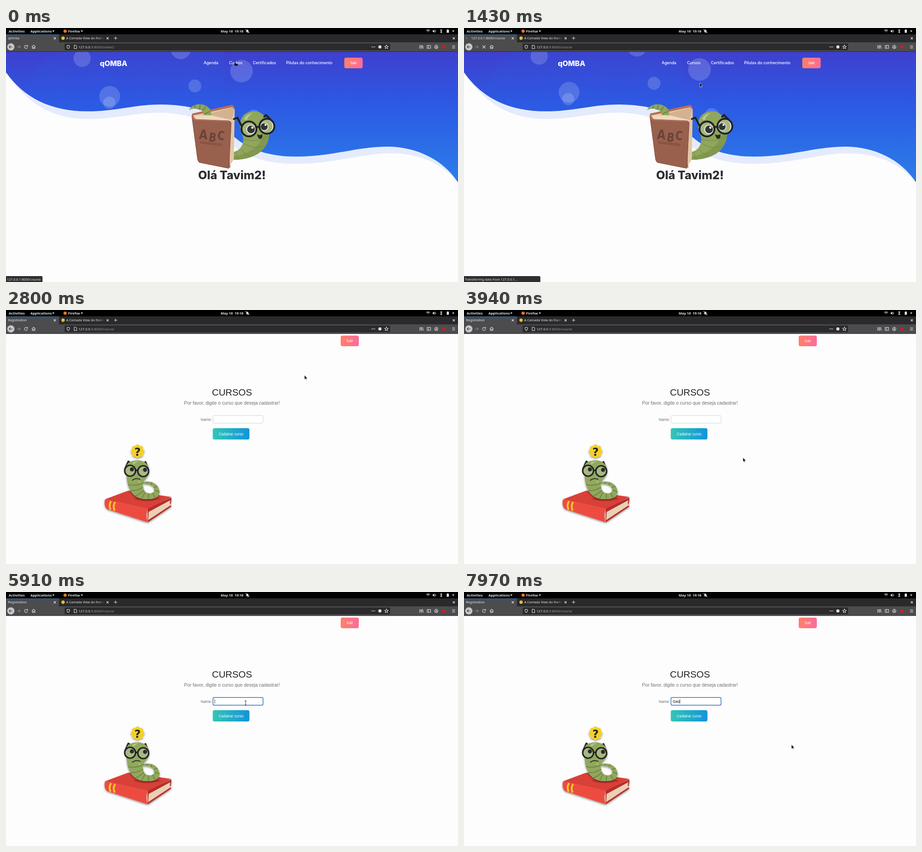
Animation, 998 px wide and 561 px high, one loop 8 s. Source, as an HTML page:

```html
<!DOCTYPE html>
<html lang="pt">
<head>
<meta charset="utf-8">
<style>
html, body { margin: 0; width: 100%; height: 100%; overflow: hidden; background: #fdfdfd; }
svg { display: block; width: 100vw; height: 100vh; }
text { white-space: pre; }
.ui { font: 7.25px "Noto Sans", sans-serif; fill: #e6e6e6; }
.menu { font: 600 7.6px "Noto Sans", sans-serif; fill: #e6e6e6; }
.url { font-size: 7.65px; }
.nav { font: 500 8.75px Inter, sans-serif; fill: #fff; }
.form { font: 8.3px "Liberation Sans", sans-serif; fill: #6c6f73; }
.line { fill: none; stroke: #ddd; stroke-width: 1.1; }
.mid { text-anchor: middle; }
.ink { fill: none; stroke: #202322; stroke-linecap: round; stroke-linejoin: round; }
</style>
</head>
<body>
<svg viewBox="0 0 998 561" preserveAspectRatio="none">
<defs>
  <linearGradient id="sky" x2="0" y2="1">
    <stop stop-color="#3e40cd"/><stop offset=".4" stop-color="#2c59e4"/><stop offset="1" stop-color="#2b7ee9"/>
  </linearGradient>
  <linearGradient id="coral"><stop stop-color="#ff8068"/><stop offset="1" stop-color="#fc6c9c"/></linearGradient>
  <linearGradient id="teal"><stop stop-color="#33c6b6"/><stop offset="1" stop-color="#1294db"/></linearGradient>
  <linearGradient id="tabFade"><stop stop-color="#2a2a2c" stop-opacity="0"/><stop offset="1" stop-color="#2a2a2c"/></linearGradient>
  <linearGradient id="burstFill"><stop stop-color="#2878b8" stop-opacity=".65"/><stop offset="1" stop-color="#2878b8" stop-opacity="0"/></linearGradient>
  <filter id="shadow" x="-20%" y="-20%" width="140%" height="140%">
    <feDropShadow dx="0" dy="2" stdDeviation="2" flood-opacity=".45"/>
  </filter>
  <clipPath id="page"><path d="M0 52H998V561H0Z"/></clipPath>
  <clipPath id="heroBody"><path d="M496 275C517 273 527 257 523 239Q515 221 517 211C519 193 531 184 548 184C569 184 580 203 581 228C583 263 557 293 495 291Z"/></clipPath>
  <clipPath id="thinkerBody"><path id="thinkerShape" d="M265 355C263 338 276 332 290 332C307 332 316 342 316 357C316 369 303 374 302 386C302 401 312 408 323 404C333 399 327 383 305 384L301 381C322 374 338 386 339 401C339 413 329 418 312 418C285 419 270 401 267 374Z"/></clipPath>
</defs>

<rect width="998" height="561" fill="#fdfdfd"/>

<g id="home" clip-path="url(#page)">
  <path fill="#e4ebfc" d="M0 52H998V341C950 285 890 275 835 277C775 280 720 300 640 300C540 300 500 262 480 240C455 205 400 189 345 187C285 186 245 201 180 201C100 201 45 165 0 98Z"/>
  <path fill="url(#sky)" d="M0 52H998V341C965 290 905 262 842 262C775 262 720 284 640 284C540 284 500 240 480 215C455 180 400 170 345 169C285 168 245 184 180 184C100 184 40 155 0 98Z"/>
  <path fill="#2b5de0" opacity=".16" d="M128 52C85 65 55 92 50 145Q100 184 180 184C245 184 285 168 345 169C400 170 455 180 480 215V52Z"/>
  <g id="bubbles" fill="#fff" fill-opacity=".17"></g>
  <text x="237.500" y="84" class="mid" style="font:800 16px Inter,sans-serif" fill="#fff">qOMBA</text>
  <g class="nav">
    <text x="436.500" y="80">Agenda</text><text x="492.500" y="80">Cursos</text>
    <text x="545" y="80">Certificados</text><text x="618.500" y="80">Pilulas do conhecimento</text>
    <rect x="747" y="65.500" width="40.500" height="23.500" rx="4" fill="url(#coral)"/>
    <text x="767.300" y="80" class="mid" style="font-size:8px">Sair</text>
  </g>

  <!-- worm and alphabet book -->
  <g clip-path="url(#heroBody)">
    <path fill="#8fa65b" d="M490 180H590V300H490Z"/>
    <path d="M573 190Q583 270 500 285V300H590V190Z" fill="#819850"/>
    <path class="line" style="stroke:#768b49" d="M522 244Q550 256 582 238M526 255Q548 271 578 258M520 268Q532 288 560 282M508 273Q508 286 516 293"/>
    <path d="M525 202Q531 189 545 188Q535 193 532 203Z" fill="#b8c98a"/>
  </g>
  <path fill="#b96c53" d="M410 195L411 189L500 169.500L505 176L504 178L495 310Z"/>
  <path fill="#e5c6a5" d="M413 193L499 175L505 180L503 290L494 304L491 208L418 201Z"/>
  <path fill="#d5b191" d="M418 197L499 176L504 180L497 207Z"/>
  <path fill="#efd9bd" d="M414 194L450 192L497 203V207L420 202Z"/>
  <path fill="#8fa65b" d="M404 182C410 167 432 165 445 174C454 181 453 188 453 193L436 192C437 184 430 178 419 178Q409 178 404 182Z"/>
  <path class="line" style="stroke:#748a46;stroke-width:3" d="M417 170L418 178M429 170L427 179M441 174L434 183M451 184L438 190"/>
  <path fill="#99604e" stroke="#7d493b" d="M410.500 196Q412 202 420 202L492 205Q498 206 497 213L492 310L427 297Q424 295 423 290Z"/>
  <path class="line" style="stroke:#c28670" d="M412 198Q414 203 421 203L493 206"/>
  <g fill="#6b4338" style="font:800 30px 'DejaVu Sans',sans-serif" class="mid">
    <text transform="translate(435 246) rotate(4) scale(.82 1)">A</text>
    <text transform="translate(455 251) rotate(8) scale(.72 .9)">B</text>
    <text transform="translate(474 247) rotate(6) scale(.72 .9)">C</text>
  </g>
  <path class="line" style="stroke:#6b4338" d="M428 251L478 257M429 254L477 260"/>
  <circle cx="536" cy="223" r="16" fill="#a6b580"/><circle cx="576" cy="217" r="16" fill="#dcdfda"/>
  <path d="M576 202A16 16 0 0 1 579 232Q561 235 560 217Q562 203 576 202Z" fill="#a6b580"/>
  <g fill="#e8e9e2"><circle cx="541" cy="224" r="10.500"/><circle cx="570" cy="218" r="9.500"/></g>
  <g fill="#303631"><circle cx="541" cy="224" r="8.500"/><circle cx="570" cy="218" r="7.700"/></g>
  <g fill="#fff"><circle cx="544" cy="220" r="2.500"/><circle cx="573" cy="214" r="2.300"/></g>
  <path class="ink" stroke-width="4" d="M520 223a16.500 16.500 0 1 0 33 0a16.500 16.500 0 1 0-33 0M559.500 217a16.500 16.500 0 1 0 33 0a16.500 16.500 0 1 0-33 0M552 220Q556 217 560 219M520 216L511 198L503 201M589 207L574 192L570 196"/>
  <path fill="#2b2c22" d="M554 234Q560 239 566 234Q568 245 560 245Q556 243 554 234Z"/>
  <text x="499" y="334" class="mid" style="font:800 25.500px Inter,sans-serif" fill="#2d2d31">Olá Tavim2!</text>
</g>

<g id="course">
  <rect x="739" y="56.500" width="40" height="23.500" rx="4" fill="url(#coral)"/>
  <text x="759" y="71" class="form mid" style="fill:#fff">Sair</text>
  <text x="499" y="189" class="form mid" style="font-size:20.700px;fill:#202327">CURSOS</text>
  <text x="499" y="209" class="form mid" style="font-size:10.370px">Por favor, digite o curso que deseja cadastrar!</text>
  <text x="430" y="244.500" class="form">Name:</text>
  <rect id="field" x="457" y="233" width="110.500" height="17" rx="2.500" fill="#fff"/>
  <text id="typed" x="461" y="244.500" class="form" style="fill:#111"></text>
  <path id="caret" d="M.5 237V246.500" stroke="#111" stroke-width=".8"/>
  <rect x="456.500" y="261" width="81" height="25" rx="4" fill="url(#teal)"/>
  <text x="497" y="276.500" class="form mid" style="fill:#fff">Cadatrar curso</text>

  <!-- thinking worm on a red book -->
  <g filter="url(#shadow)">
    <path fill="#b52e2b" d="M313 438L365 414V420L363 431L365 434L313 469Z"/>
    <path fill="#ead0b5" d="M315 446L363 420Q360 427 364 431L314 464Z"/>
    <path fill="#d94038" d="M219 418L270 399L365 413L313 439Z"/>
    <path fill="#ee4b41" d="M219 418Q217 423 218 430Q219 437 224 440L313 469Q307 453 313 439Z"/>
    <path class="line" style="stroke:#f6c928;stroke-width:4" d="M232 422Q226 431 231 441M241 424Q235 433 240 443"/>
  </g>
  <ellipse cx="312" cy="417" rx="30" ry="4" fill="#a92e29" opacity=".6"/>
  <g filter="url(#shadow)">
    <path class="ink" stroke-width="3" d="M263 350L270 334L280 342M301 342L308 335L314 350"/>
    <use href="#thinkerShape" fill="#91a85d"/>
  </g>
  <g clip-path="url(#thinkerBody)">
    <path class="line" style="stroke:#778c49;stroke-width:2.500" d="M264 383Q281 392 305 381M268 397Q286 403 303 391M279 413Q292 410 305 398M298 420L307 402M314 420L315 404M331 418L323 402M342 403L327 397M337 388L325 393M323 376L320 388M311 376V387"/>
    <path fill="#b5c487" d="M279 338Q285 333 293 334Q285 337 282 342Z"/>
  </g>
  <g fill="#a9b781"><circle cx="274" cy="355" r="11"/><circle cx="303" cy="356" r="11"/></g>
  <g fill="#282d29"><circle cx="278" cy="352" r="4.500"/><circle cx="307" cy="353" r="4.500"/></g>
  <path class="ink" stroke-width="3.200" d="M262 355a12 12 0 1 0 24 0a12 12 0 1 0-24 0M291 356a12 12 0 1 0 24 0a12 12 0 1 0-24 0M286 355Q289 353 291 355"/>
  <path class="ink" stroke-width="1.800" d="M279 376Q287 370 296 374"/>
  <path class="line" style="stroke:#c0cc98;stroke-width:2" d="M293 378L296 382"/>
  <path id="badge" fill="#f5d028" filter="url(#shadow)"/>
  <text x="290.500" y="321.500" class="mid" style="font:800 24px 'DejaVu Sans',sans-serif" fill="#242424">?</text>
</g>

<!-- desktop bar and browser -->
<rect width="998" height="52.500" fill="#4c4c4f"/>
<rect x="117" y="14" width="881" height="17" fill="#2a2a2c"/>
<rect width="998" height="14" fill="#000"/>
<rect y="14" width="117" height="1" fill="#2c608f"/>
<path d="M117 31H998" stroke="#252527"/>
<path d="M0 52H998" stroke="#29292b"/>
<rect id="burst" y="15" width="85" height="16" fill="url(#burstFill)"/>
<g class="menu">
  <text x="6" y="9.800">Activities</text><text x="54" y="9.800">Applications</text>
  <text x="137" y="9.800">Firefox</text><text x="474" y="9.800">May 16  19:16</text>
</g>
<path fill="#ddd" d="M102 5.500h5l-2.500 3.500zM165 5.500h5l-2.500 3.500zM985 5.500h5l-2.500 3.500z"/>
<circle cx="130.500" cy="7" r="3.600" fill="#e8752b"/>
<path fill="#ddd" d="M529 9Q531 8 531 5Q533 2 535 5Q535 8 537 9ZM532 10h2v1h-2zM942 5.500h2l2-2v7l-2-2h-2zM973 4h1.500V3h2v1H978v6.500h-5z"/>
<path class="line" d="M529 3L537 11M928 5.500Q932 2 936 5.500M929.500 7.300Q932 5 934.500 7.300M931.500 9.500h1M947.500 4.500Q950 7 947.500 9.500M959 7h4M961 3.500v7M959 5l2-1.500l2 1.500M959 9l2 1.500l2-1.500"/>
<g class="ui">
  <text id="tabTitle" y="25"></text>
  <text x="133" y="25">A Camada View do frame</text>
</g>
<circle id="spinner" cy="22.500" r="1" fill="#aaa"/>
<rect x="202" y="16" width="16" height="14" fill="url(#tabFade)"/>
<circle cx="126" cy="22.500" r="3.700" fill="#e4bd35"/>
<path class="line" d="M105.500 20.500l4.500 4.500m0-4.500l-4.500 4.500M222 20.500l4.500 4.500m0-4.500l-4.500 4.500M238.500 22.500h7m-3.500-3.500v7M986.500 20.500l4.500 4.500m0-4.500l-4.500 4.500"/>
<circle cx="10.700" cy="41.700" r="8" fill="#c9c9cb" stroke="#858588"/>
<path class="line" style="stroke:#39393c" d="M14.500 41.700H7M10 38.500l-3 3.200l3 3.200"/>
<path class="line" style="stroke:#8b8b8e" d="M24 41.700h7.500M28.500 38.500l3 3.200l-3 3.200"/>
<path id="reload" class="line" d="M47 39.500a3.500 3.500 0 1 0 .5 3.500M47.700 37.500v3h-3"/>
<path id="stop" class="line" d="M41 38.500l6.500 6.500m0-6.500l-6.500 6.500"/>
<path class="line" d="M57 41.500l4-3.500l4 3.500M58.300 41.500v3.700h1.700v-2.500h2v2.500h1.700v-3.700"/>
<rect x="130" y="35" width="717.500" height="13.500" rx="1.500" fill="#2b2b2d" stroke="#222224"/>
<path class="line" d="M134.500 39q2 0 3-1q1 1 3 1q0 5-3 6.500q-3-1.500-3-6.500zM150.500 38h3.500l2 2v5.500h-5.500zM840 37.500l1.200 2.700l2.800.3l-2.200 1.900l.7 2.900l-2.500-1.500l-2.500 1.500l.7-2.900l-2.200-1.900l2.800-.3z"/>
<text y="44.700" x="160" class="ui url">127.0.0.1<tspan id="path" fill="#98989b"></tspan></text>
<g fill="#ddd"><circle cx="808" cy="41.700" r="1"/><circle cx="811" cy="41.700" r="1"/><circle cx="814" cy="41.700" r="1"/><circle cx="825.500" cy="41.700" r="3.500"/></g>
<path class="line" d="M913.500 38v7.500M916 38v7.500M918 38v7.500M919.500 38l2 7.500M930 38.500h7.500v6.500H930zM933 38.500v6.500M985 39h6.500M985 41.700h6.500M985 44.500h6.500"/>
<circle cx="950" cy="41.700" r="3.700" class="line"/><circle cx="950" cy="40.700" r="1.300" fill="#ddd"/>
<path d="M947.500 44q2.500-2.500 5 0" class="line"/>
<circle cx="967" cy="41.700" r="3.700" fill="#d71920"/>

<g id="status">
  <rect id="statusBox" x="-1" y="548.500" height="14" rx="1.500" fill="#2d2f30" stroke="#202122"/>
  <text id="statusText" x="2" y="557.500" class="ui"></text>
</g>
<g id="pointer">
  <path id="arrow" d="M0 0V9.500L2.200 7.500L3.700 10.500L5 9.800L3.600 7H6.500Z" fill="#0b0b0b" stroke="#fff" stroke-width=".6"/>
  <path id="hand" d="M-2-4q1-1 1.500 0V0h4q1.500 0 1.300 2l-.8 2.500H-1L-4 0q1-1 2 0z" fill="#0b0b0b" stroke="#777" stroke-width=".3"/>
  <path id="beam" d="M-2-4.500h4M0-4.500v9M-2 4.500h4" fill="none" stroke="#222"/>
</g>
</svg>
<script>
const DURATION = 8000;
const COMMIT = 1250, PAGE_SHOWN = 1560, LOADED = 1840, IDLE = 2250, FOCUS = 5845;
const $ = id => document.getElementById(id);
const show = (id, on) => { $(id).style.display = on ? "" : "none"; };
const setText = (id, value) => { if ($(id).textContent !== value) $(id).textContent = value; };
const attr = (id, values) => Object.entries(values).forEach(([k, v]) => $(id).setAttribute(k, v));

// x, y, radius, then drift over 1430 ms
const bubbles = [
  [168, 67, 19, -2, -5], [386, 47, 22, -4, -6], [520, 95, 25, 0, -3.5],
  [417, 128, 14.300, 2.500, -6], [229, 151, 23, 3, -9], [228, 165, 13.500, 2, -8], [547, 196, 16, 0, -3]
].map(([x, y, r, dx, dy]) => {
  const circle = document.createElementNS("http://www.w3.org/2000/svg", "circle");
  circle.setAttribute("r", r);
  $("bubbles").append(circle);
  return { circle, x, y, dx, dy };
});

const scallop = Array.from({ length: 90 }, (_, i) => {
  const a = i * Math.PI / 45, r = 14 + Math.cos(a * 8);
  return `${290.5 + r * Math.cos(a)} ${312 + r * Math.sin(a)}`;
});
attr("badge", { d: `M${scallop.join("L")}Z` });

// time, x, y
const route = [
  [0, 507, 79], [900, 507, 79], [1300, 520.500, 121], [2450, 520.500, 121],
  [2770, 659, 144], [2950, 659, 144], [3700, 616, 326], [4450, 616, 326],
  [5000, 585, 292], [5500, 529, 245], [6050, 529, 245], [6550, 723, 337], [8000, 723, 337]
];
const keys = [[6780, "G"], [7200, "Ge"], [7700, "Geo"]];

function pointerAt(t) {
  const i = route.findIndex(stop => stop[0] > t);
  const [t0, x0, y0] = route[i - 1], [t1, x1, y1] = route[i];
  const p = (t - t0) / (t1 - t0), e = p * p * (3 - 2 * p);
  return [x0 + (x1 - x0) * e, y0 + (y1 - y0) * e];
}

function drawPointer(t) {
  const [x, y] = pointerAt(t);
  const overLink = t < PAGE_SHOWN && y < 86;
  const overField = t > PAGE_SHOWN && x > 457 && x < 567 && y > 233 && y < 250;
  attr("pointer", { transform: `translate(${x} ${y})` });
  show("hand", overLink);
  show("beam", overField);
  show("arrow", !overLink && !overField);
}

function drawBrowser(t) {
  const loading = t > 450 && t < LOADED;
  setText("tabTitle", t < COMMIT ? "qOmba" : t < PAGE_SHOWN ? "127.0.0.1:8000/course" : "Registration");
  attr("tabTitle", { x: t > 450 && t < IDLE ? 16 : 4.500 });
  setText("path", t < COMMIT ? ":8000/index2" : ":8000/course");
  show("spinner", loading);
  attr("spinner", { cx: 6 + 3 * Math.sin((t - 1430) / 160) });
  show("reload", t < 450 || t > IDLE);
  show("stop", t >= 450 && t <= IDLE);
  $("stop").style.opacity = loading ? 1 : .3;
  show("burst", t > LOADED && t < IDLE);
  $("burst").style.opacity = Math.min(1, (IDLE - t) / 300);
  show("status", t < 1750);
  const hovering = t < 1020;
  setText("statusText", hovering ? "127.0.0.1:8000/course" : "Transferring data from 127.0.0.1…");
  attr("statusBox", { width: hovering ? 81 : 169 });
}

function drawForm(t) {
  const focused = t >= FOCUS;
  const pressed = keys.filter(key => key[0] <= t).pop() || [FOCUS, ""];
  setText("typed", pressed[1]);
  attr("field", { stroke: focused ? "#3971b8" : "#c5c7c9", "stroke-width": focused ? 1.500 : .8 });
  show("caret", focused && (t - pressed[0]) % 1060 < 530);
  const width = pressed[1] ? $("typed").getComputedTextLength() : 0;
  attr("caret", { transform: `translate(${460.5 + width} 0)` });
}

function draw(now) {
  const t = now % DURATION;
  show("home", t < PAGE_SHOWN);
  show("course", t >= PAGE_SHOWN);
  for (const { circle, x, y, dx, dy } of bubbles) {
    circle.setAttribute("cx", x + dx * t / 1430);
    circle.setAttribute("cy", y + dy * t / 1430);
  }
  drawBrowser(t);
  drawForm(t);
  drawPointer(t);
}

const start = performance.now();
function tick() {
  draw(performance.now() - start);
  requestAnimationFrame(tick);
}
tick();
</script>
</body>
</html>
```
